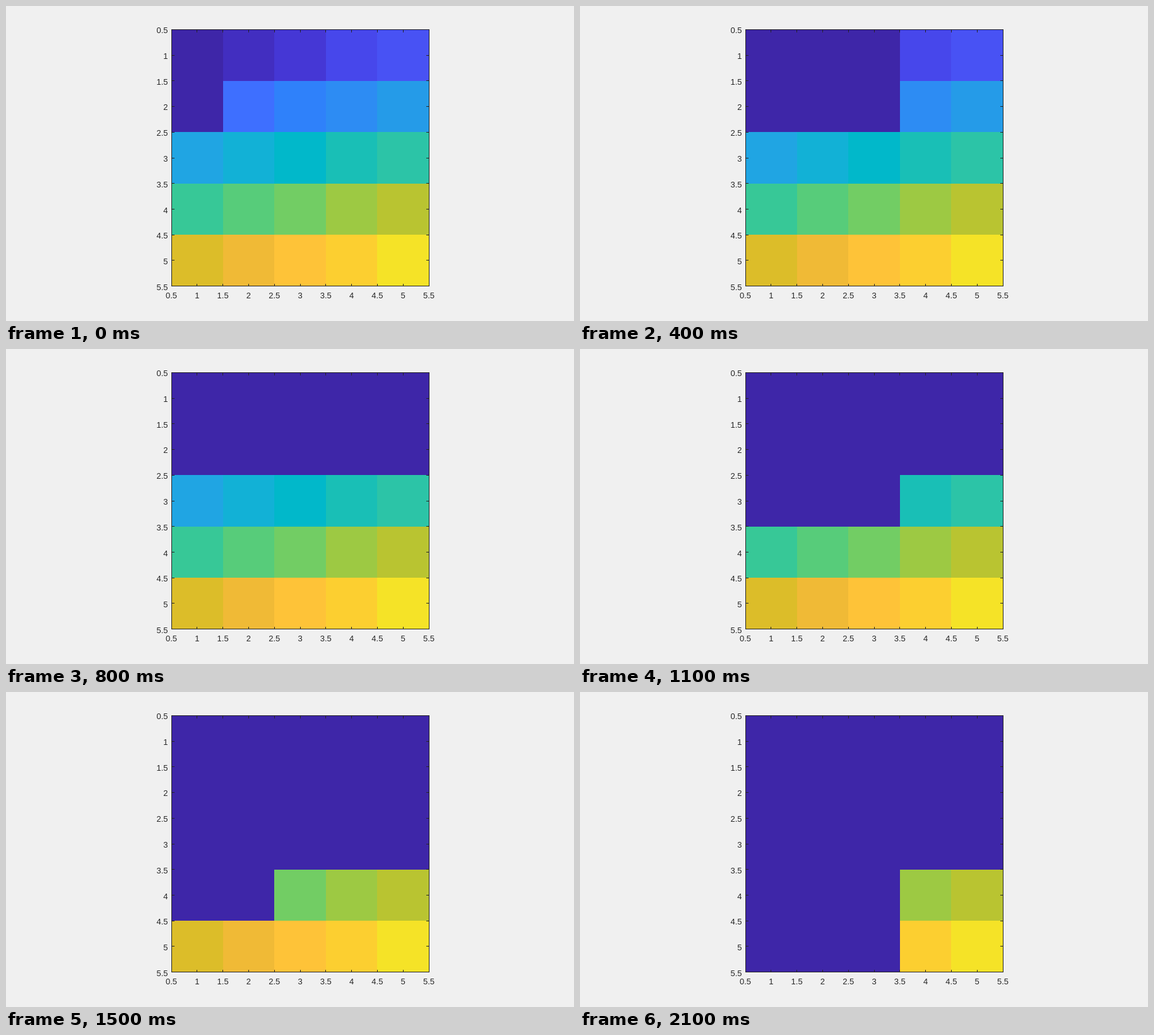
Write an HTML page that moves like this. It is 900 by 500 pixels and loops after 2.4 s.

```html
<!DOCTYPE html>
<html lang="en">
<head>
<meta charset="utf-8">
<title>Clearing grid</title>
<style>
  html, body { margin: 0; width: 100%; height: 100%; overflow: hidden; background: #f0f0f0; }
  svg { display: block; }
  rect { shape-rendering: crispEdges; }
  text { font: 13px "Liberation Sans", Arial, sans-serif; fill: #262626; }
</style>
</head>
<body>
<svg id="stage" width="900" height="500" viewBox="0 0 900 500"></svg>
<script>
const stage = document.getElementById('stage');
const LOOP = 2400, STEP = 100;
const CLEARED = '#3e26a8', INK = '#262626';
const COLORS = `
  3e26a8 422ec0 4537d5 4747eb 4852f4
  3e26a8 3e6fff 2f81fa 2d8cf3 259be8
  20a5e3 12b1d6 01b8ca 19bfb6 2cc4a7
  37c897 57cc7a 72cd64 9dc943 b9c431
  dcbd29 f0ba36 fec338 fccf30 f5e327`.trim().split(/\s+/).map(c => '#' + c);
const xs = [263, 344, 425, 507, 588, 670];
const ys = [38, 119, 200, 282, 363, 444];

function add(tag, attrs, text = '') {
  const el = document.createElementNS('http://www.w3.org/2000/svg', tag);
  for (const name in attrs) el.setAttribute(name, attrs[name]);
  el.textContent = text;
  return stage.appendChild(el);
}

function box(x, y, width, height, fill = INK) {
  return add('rect', { x, y, width, height, fill });
}

// The top two rows clear column by column, the others row by row;
// the lower right block of four stays.
function clearStep(row, col) {
  if (row < 2) return col * 2 + row - 1;
  return row > 2 && col > 2 ? row === 3 && col === 2 ? 16 : Infinity : row * 5 + col - 1;
}

const cells = COLORS.map((color, i) => {
  const row = Math.floor(i / 5), col = i % 5;
  const el = box(xs[col], ys[row], xs[col + 1] - xs[col], ys[row + 1] - ys[row]);
  return { el, color, step: clearStep(row, col) };
});

box(262, 37, 409, 1);
box(262, 444, 409, 1);
box(262, 37, 1, 408);
box(670, 37, 1, 408);

for (let i = 0; i <= 10; i++) {
  const x = Math.floor(262 + 40.8 * i), y = Math.round(37 + 40.7 * i);
  const label = String(0.5 + i / 2);
  box(x, 38, 1, 4);
  box(x, 441, 1, 4);
  box(263, y, 4, 1);
  box(666, y, 4, 1);
  add('text', { x: 262 + 40.8 * i, y: 464, 'text-anchor': 'middle' }, label);
  add('text', { x: 256.5, y: Math.round(43 + 40.8 * i), 'text-anchor': 'end' }, label);
}

function draw(now) {
  const step = Math.floor(now % LOOP / STEP);
  for (const { el, color, step: clearAt } of cells) {
    el.setAttribute('fill', step >= clearAt ? CLEARED : color);
  }
  requestAnimationFrame(draw);
}
draw(performance.now());
</script>
</body>
</html>
```
